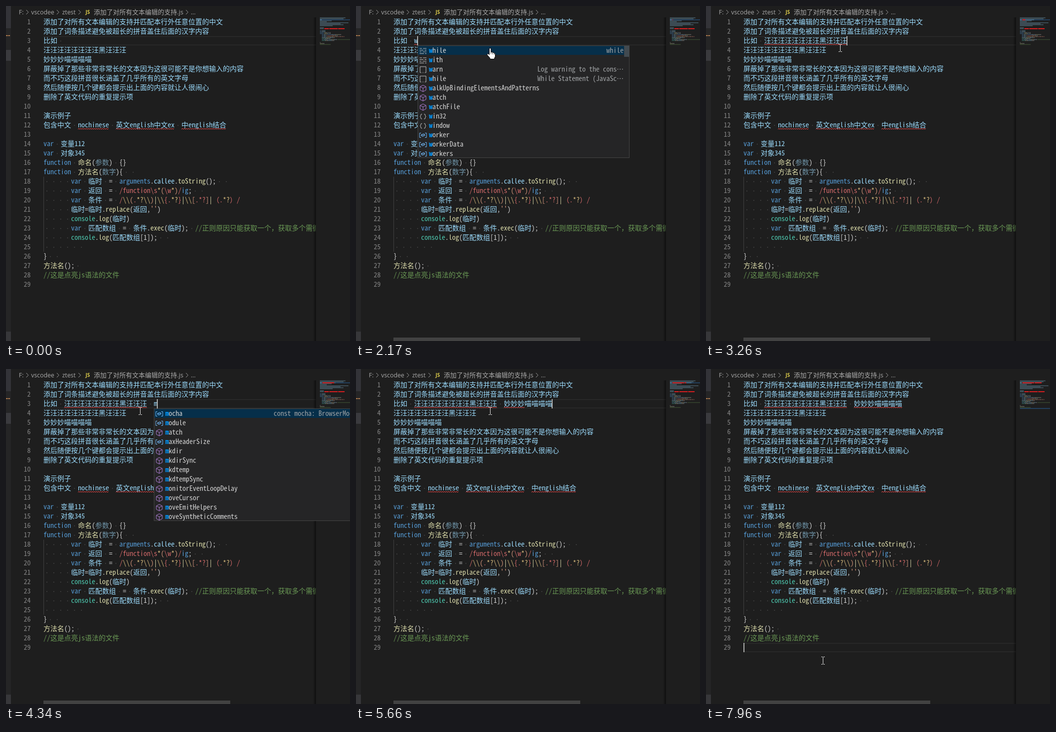
An HTML page that plays this animation: 698 by 679 pixels, repeating every 8000 ms.

```html
<!DOCTYPE html>
<html lang="zh">
<head>
<meta charset="utf-8">
<style>
:root { --mono: "Noto Sans Mono CJK SC", "Liberation Mono", monospace; }
html, body { margin: 0; width: 100%; height: 100%; overflow: hidden; background: #1e1e1e; }
svg { display: block; }
text { white-space: pre; }
.wide { font: 300 14px "Noto Sans CJK SC", "Noto Sans CJK", sans-serif; }
.code { font-family: var(--mono); font-variant-ligatures: none; }
.crumb { font: 12.4px "Open Sans", "Noto Sans CJK SC", sans-serif; }
</style>
</head>
<body>
<svg id="stage" width="698" height="679" viewBox="0 0 698 679"></svg>
<script>
const NS = 'http://www.w3.org/2000/svg';
const LOOP = 8000, ROW = 19, CELL = 7, TEXT_X = 76, WORD_X = 118, MAP_X = 637;
const COLORS = {
  v: '#9cdcfe', k: '#569cd6', f: '#dcdcaa', c: '#6a9955', r: '#d16969', e: '#d7ba7d',
  s: '#ce9178', t: '#d4d4d4', o: '#4ec9b0', d: '#6f94a8', n: '#858585', h: '#0097fb', g: '#a0a3a5'
};

// Parts are split by "~"; the first letter of each part is its colour.
const CODE = [
  'v添加了对所有文本编辑的支持并匹配本行外任意位置的中文',
  'v添加了词条描述避免被超长的拼音盖住后面的汉字内容',
  'v比如 ',
  'v汪汪汪汪汪汪汪汪黑汪汪汪',
  'v妙妙妙喵喵喵喵',
  'v屏蔽掉了那些非常非常长的文本因为这很可能不是你想输入的内容',
  'v而不巧这段拼音很长涵盖了几乎所有的英文字母',
  'v然后随便按几个键都会提示出上面的内容就让人很闹心',
  'v删除了英文代码的重复提示项',
  '',
  'v演示例子',
  'v包含中文 nochinese 英文english中文ex 中english结合',
  '',
  'kvar~v 变量112',
  'kvar~v 对象345',
  'kfunction~f 命名~t(~d参数~t) {}',
  'kfunction~f 方法名~t(~d数字~t){  ',
  't    ~kvar~v 临时~t = ~karguments~t.~vcallee~t.~ftoString~t();  ',
  't    ~kvar~v 返回~t = ~r/function\\s~e*~s(~r\\w~e*~s)~r/~kig~t;  ',
  't    ~kvar~v 条件~t = ~r/~e\\\\~s(~r.~e*?\\\\~s)~f|~e\\\\~r{.~e*?~r}~f|~e\\\\~s[~r.*?~s]~f|~r（.~e*?~r）/',
  't    ~v临时~t=~v临时~t.~freplace~t(~v返回~t,~s\'\'~t)',
  't    ~oconsole~t.~flog~t(~v临时~t)',
  't    ~kvar~v 匹配数组~t = ~v条件~t.~fexec~t(~v临时~t); ~c//正则原因只能获取一个，获取多个需循环',
  't    ~oconsole~t.~flog~t(~v匹配数组~t[1]);  ',
  't      ',
  't}  ',
  'f方法名~t(); ',
  'c//这是点亮js语法的文件',
  ''
];

const BARK = '汪汪汪汪汪汪汪汪黑汪汪汪', MEOW = '妙妙妙喵喵喵喵';

// Each row: icon letter, label, optional detail.
const POPUPS = {
  w: { x: 125, rows: ['kwhile|while', 'kwith', 'swarn|Log warning to the cons…', 'swhile|While Statement (JavaSc…',
    'mwalkUpBindingElementsAndPatterns', 'mwatch', 'mwatchFile', 'nwin32', 'nwindow', 'vworker', 'vworkerData', 'vworkers'] },
  wa: { x: 132, rows: ['swarn|Log warning to the cons…', 'mwalkUpBindingElementsAndPatterns', 'mwatch', 'mwatchFile',
    'k' + BARK, 'munwatchFile', 'vWeakMap', 'vWeakSet', 'nWebAssembly', 'mwriteHeapSnapshot'] },
  wan: { x: 132, rows: ['k' + BARK] },
  m: { x: 300, rows: ['vmocha|const mocha: BrowserMoc…', 'vmodule', 'mmatch', 'vmaxHeaderSize', 'mmkdir', 'mmkdirSync', 'mmkdtemp',
    'mmkdtempSync', 'mmonitorEventLoopDelay', 'mmoveCursor', 'mmoveEmitHelpers', 'mmoveSyntheticComments'] },
  mi: { x: 300, rows: ['k' + MEOW, 'mmkdir', 'mmkdirSync', 'mmonitorEventLoopDelay'] }
};

const ICONS = {
  k: ['#c5c5c5', 'M-7-5h5M0-5h7M-7-1.5h8M3-1.5h4M-7 2h4M-1 2h8M-7 5.5h9M4 5.5h3'],
  s: ['#c5c5c5', 'M-6 6v-12h12v12M-6 6h2M-2 6h1M1 6h1M4 6h2'],
  m: ['#b180d7', 'M0-6.5L6-3.5V3.5L0 6.5L-6 3.5V-3.5ZM-6-3.5L0-.5L6-3.5M0-.5V6.5'],
  n: ['#d0d0d0', 'M-2-5q-2.5 0-2.5 2v1.5L-6 0l1.5 1.5V3q0 2 2.5 2M2-5q2.5 0 2.5 2v1.5L6 0l-1.5 1.5V3q0 2-2.5 2'],
  v: ['#75beff', 'M-4-4.5h-3v9h3M4-4.5h3v9h-3M-3.5 1V-1L1-3L3.5-1.5V.5L-1 2.5ZM-3.5-1L-1 .3L3.5-1.5']
};

function add(parent, tag, attrs = {}, content = '') {
  const node = document.createElementNS(NS, tag);
  for (const key in attrs) node.setAttribute(key, attrs[key]);
  node.textContent = content;
  parent.append(node);
  return node;
}
const rect = (g, x, y, width, height, fill) => add(g, 'rect', { x, y, width, height, fill });
const path = (g, d, stroke, extra) => add(g, 'path', { d, stroke, fill: 'none', ...extra });
const lineTop = n => 23 + ROW * (n - 1);

// Font size at which one monospace character fills one cell.
function cellFontSize() {
  const ctx = document.createElement('canvas').getContext('2d');
  ctx.font = '100px ' + getComputedStyle(document.documentElement).getPropertyValue('--mono');
  return 100 * CELL / ctx.measureText('0').width;
}
const codeSize = cellFontSize();

const isWide = s => /[\u2e80-\uffff…]/.test(s);
const textWidth = (s, gap = 14) => [...s].reduce((w, ch) => w + (ch === ' ' ? gap : isWide(ch) ? 2 * CELL : CELL), 0);

function eachRun(markup, visit) {
  for (const part of markup.split('~'))
    for (const run of part.slice(1).match(/ |[\u2e80-\uffff…]+|[^ \u2e80-\uffff…]+/g) || [])
      visit(run, COLORS[part[0]]);
}

function write(g, x, top, markup, gap = 14) {
  eachRun(markup, (run, fill) => {
    if (run !== ' ') {
      const font = isWide(run) ? { class: 'wide' } : { class: 'code', 'font-size': codeSize };
      add(g, 'text', { x, y: top + 14, fill, ...font }, run);
    } else if (gap === 14) rect(g, x + 6, top + 9, 2, 2, '#3a3a3a');
    x += textWidth(run, gap);
  });
}

function writeMap(g, line, markup) {
  let x = MAP_X;
  const y = 24 + 2 * (line - 1);
  eachRun(markup, (run, stroke) => {
    const width = run === ' ' ? 1 : textWidth(run) / CELL;
    if (run !== ' ') path(g, `M${x} ${y}h${width}`, stroke, { 'stroke-dasharray': '1.5 .5', opacity: .65 });
    x += width;
  });
}

function squiggle(g, from, to, bottom) {
  let d = `M${from} ${bottom - 1}`;
  for (let x = from + 2, up = true; x <= to; x += 2, up = !up) d += `L${x} ${bottom - (up ? 3 : 1)}`;
  path(g, d, '#f14c4c');
}

function drawPopup(g, { x, rows }, typed) {
  add(g, 'rect', { x: x + .5, y: 80.5, width: 429, height: ROW * rows.length - 1, fill: '#252526', stroke: '#454545' });
  rect(g, x + 1, 81, 428, ROW - 1, '#062f4a');
  rows.forEach((row, i) => {
    const top = 81 + ROW * i, [label, detail] = row.slice(1).split('|');
    const [color, d] = ICONS[row[0]];
    path(g, d, color, { transform: `translate(${x + 11} ${top + 10})` });
    let hit = 0;
    while (hit < typed.length && label[hit].toLowerCase() === typed[hit]) hit++;
    write(g, x + 23, top, `h${label.slice(0, hit)}~t${label.slice(hit)}`, CELL);
    if (hit) write(g, x + 23.5, top, 'h' + label.slice(0, hit), CELL);
    if (detail) write(g, x + 418 - textWidth(detail, CELL), top, 'g' + detail, CELL);
  });
  if (rows.length > 10) rect(g, x + 419, 81, 10, 22, '#424a50');
}

function drawMouse(g, [x, y], hand) {
  const transform = `translate(${x + .5} ${y + .5})`;
  if (hand) {
    add(g, 'path', { transform, fill: '#fff', stroke: '#000',
      d: 'M-2 12V1.5a1.7 1.7 0 0 1 3.4 0V8q3-.8 3.4 1q3-.6 3.2 1q2 0 2 2v4q0 2-1.6 4v2h-9v-2L-6 14q-1.2-2.4.8-2.8q1.6 0 3.2 2z' });
    path(g, 'M1.4 8v4M4.8 9v3.5M8 10v3', '#000', { transform, 'stroke-width': .8 });
  } else path(g, 'M-3.5-8h2.5l1 1 1-1h2.5M0-7V6M-3.5 7h2.5l1-1 1 1h2.5', '#e8e8e8', { transform });
}

const stage = document.getElementById('stage');
const layer = () => add(stage, 'g');

function drawFrame(g) {
  const strip = [[0, 679, '#252526'], [0, 45, '#333338'], [89, 22, '#3a3a3e'], [660, 19, '#37373a']];
  strip.forEach(([y, h, fill]) => rect(g, 0, y, 10, h, fill));
  [0, 3, 6].forEach(x => rect(g, x, 59, 2, 2, '#c98a55'));
  const crumb = (x, s) => add(g, 'text', { x, y: 17, fill: '#a9a9a9', class: 'crumb' }, s);
  crumb(26, 'F:');
  crumb(51, 'vscodee');
  crumb(114, 'ztest');
  crumb(178, '添加了对所有文本编辑的支持.js').style.fontSize = '13px';
  crumb(375, '...');
  add(g, 'text', { x: 161.5, y: 16, fill: '#dccb4a', style: 'font:700 10px "Open Sans",sans-serif' }, 'JS');
  [43, 105, 149, 367].forEach(x => path(g, `M${x - 2} 8l4.5 4.5-4.5 4.5`, '#a0a0a0'));
}

function drawCode(g) {
  CODE.forEach((markup, i) => {
    const n = i + 1;
    write(g, 50 - CELL * String(n).length, lineTop(n), 'n' + n);
    write(g, TEXT_X, lineTop(n), markup);
  });
  rect(g, TEXT_X, lineTop(18), 1, ROW * 8, '#404040');
  [[146, 209], [223, 342], [356, 447]].forEach(([a, b]) => squiggle(g, a, b, lineTop(13)));
}

function drawMap(g) {
  const fade = add(add(stage, 'defs'), 'linearGradient', { id: 'fade' });
  add(fade, 'stop', { offset: 0, 'stop-color': '#000', 'stop-opacity': 0 });
  add(fade, 'stop', { offset: 1, 'stop-color': '#000', 'stop-opacity': .5 });
  rect(g, 623, 23, 6, 656, 'url(#fade)');
  rect(g, 629, 23, 69, 656, '#1e1e1e');
  CODE.forEach((markup, i) => writeMap(g, i + 1, markup));
  [[646, 9], [656, 17], [674, 13]].forEach(([x, w]) => rect(g, x, 45, w, 2, '#d81e20'));
}

const mark = layer(), back = layer();
drawFrame(back);
drawCode(back);
const typedLine = layer(), map = layer();
drawMap(map);
const front = layer();

// State changes; each entry keeps what the earlier ones set.
const events = [
  [0, { word: '', under: [], red: [], caret: false, popup: '', mouse: null, hand: false, line: 3, mapLine: 3, bar: false }],
  [310, { bar: true }],
  [1190, { mouse: [208, 75] }],
  [1310, { caret: true }],
  [1630, { mouse: [272, 85] }],
  [1860, { caret: false }],
  [2070, { word: 'w', caret: true }],
  [2170, { popup: 'w', hand: true, under: [[118, 125]], red: [[642, 1]] }],
  [2280, { word: 'wa', popup: 'wa' }],
  [2500, { word: 'wan', popup: 'wan', under: [[118, 139]], red: [[642, 3]] }],
  [2930, { word: 'wang', under: [[118, 146]], red: [[642, 4]] }],
  [3260, { word: BARK, popup: '', hand: false, under: [[118, 286]], red: [[642, 6]] }],
  [3590, { red: [[642, 24]] }],
  [3810, { word: BARK + ' ' }],
  [4240, { word: BARK + ' m' }],
  [4340, { popup: 'm' }],
  [4460, { word: BARK + ' mi' }],
  [4580, { popup: 'mi' }],
  [4900, { word: BARK + ' mia', under: [[118, 286], [300, 321]], red: [[642, 24], [667, 3]] }],
  [5010, { word: BARK + ' miao' }],
  [5560, { word: BARK + ' ' + MEOW, under: [[118, 286], [300, 342]] }],
  [5660, { popup: '' }],
  [5990, { under: [[118, 286], [300, 398]], red: [[642, 24], [667, 14]] }],
  [6100, { caret: false }],
  [6660, { caret: true }],
  [6860, { line: 29, mouse: [237, 591] }],
  [6980, { mapLine: 29 }],
  [7530, { caret: false }],
  [7960, { caret: true }]
];

function glide(start, end, steps, from, to, ease) {
  for (let i = 0; i < steps; i++) {
    const u = ease((i + 1) / steps);
    const mouse = from.map((a, k) => Math.round(a + (to[k] - a) * u));
    events.push([Math.round((start + (end - start) * i / (steps - 1)) / 10) * 10, { mouse }]);
  }
}
glide(310, 1090, 8, [482, 672], [208, 78], u => 1 - (1 - u) ** 2);
glide(6420, 6660, 3, [272, 85], [237, 585], u => u * u * (3 - 2 * u));
events.sort((a, b) => a[0] - b[0]);

function render(s) {
  [mark, typedLine, front].forEach(g => g.replaceChildren());
  const top = lineTop(s.line);
  rect(mark, TEXT_X, top, 553, 2, '#282828');
  rect(mark, TEXT_X, top + 17, 553, 2, '#282828');

  write(typedLine, WORD_X, lineTop(3), 'v' + s.word);
  s.under.forEach(([a, b]) => squiggle(typedLine, a, b, lineTop(4)));
  if (s.caret) rect(typedLine, s.line === 3 ? WORD_X - 1 + textWidth(s.word) : TEXT_X, top, 2, ROW, '#aeafad');

  rect(front, MAP_X, 23 + 2 * (s.mapLine - 1), 61, 2, '#264f78').setAttribute('opacity', .7);
  writeMap(front, 3, 'v比如 ' + s.word);
  s.red.forEach(([x, w]) => rect(front, x, 27, w, 2, '#d81e20'));
  if (s.bar) rect(front, TEXT_X, 672, 379, 7, '#424242');
  if (s.popup) drawPopup(front, POPUPS[s.popup], s.popup);
  if (s.mouse) drawMouse(front, s.mouse, s.hand);
}

const began = performance.now();
let shown = -1;
function tick() {
  const t = (performance.now() - began) % LOOP;
  const count = events.filter(e => e[0] <= t).length;
  if (count !== shown) {
    shown = count;
    render(Object.assign({}, ...events.slice(0, count).map(e => e[1])));
  }
  requestAnimationFrame(tick);
}
tick();
</script>
</body>
</html>
```
